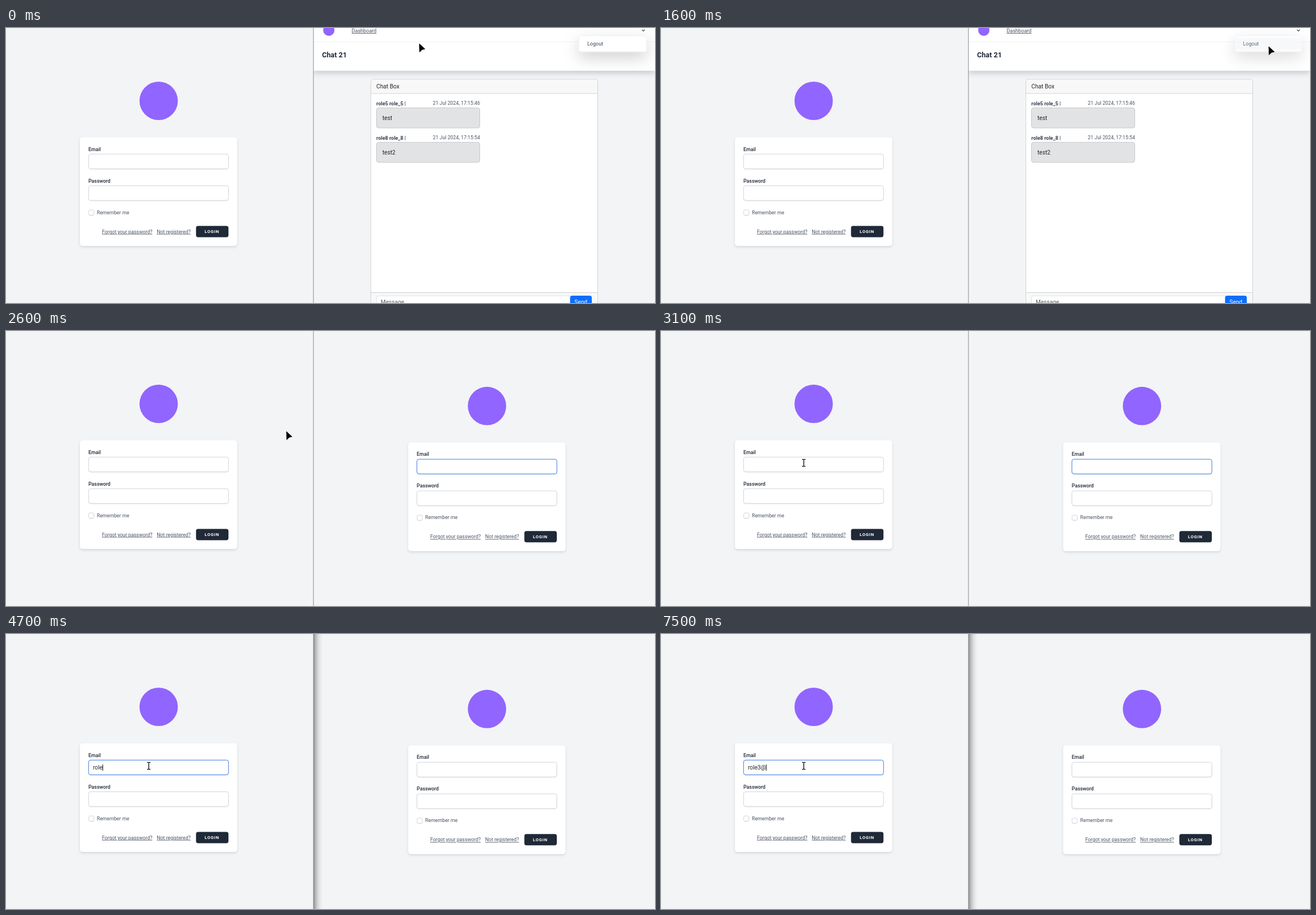
Recreate the animation shown at these times as an HTML page. Size 1150 by 487 pixels, loop 8000 ms.

```html
<!DOCTYPE html>
<html lang="en">
<head>
<meta charset="utf-8">
<title>Login and chat</title>
<style>
  html, body { margin: 0; width: 100%; height: 100%; overflow: hidden; background: #f3f4f6; }
  svg { display: block; width: 100vw; height: 100vh; }
  text { font-family: Roboto, "Noto Sans", sans-serif; font-size: 8.8px; fill: #4b5563; white-space: pre; }
  .label { font-weight: 500; fill: #1f2937; }
  .link { text-decoration: underline; }
  .body { font-size: 10.2px; fill: #212529; }
  .title { font-size: 12.6px; font-weight: 700; fill: #1f2937; }
  .author { font-size: 9px; font-weight: 700; fill: #374151; }
  .button { font-size: 7.7px; font-weight: 700; fill: #fff; letter-spacing: .1em; }
  .field { fill: #fff; stroke: #d1d5db; filter: url(#soft); }
  .field.focus { stroke: #3f7be6; }
  .caret { stroke: #111; stroke-width: 1; }
</style>
</head>
<body>
<svg id="stage" viewBox="0 0 1150 487" preserveAspectRatio="none">
  <defs>
    <filter id="soft" x="-5%" y="-30%" width="110%" height="180%">
      <feDropShadow dx="0" dy=".7" stdDeviation=".7" flood-opacity=".1"/>
    </filter>
    <filter id="raised" x="-10%" y="-10%" width="120%" height="120%">
      <feDropShadow dx="0" dy="2" stdDeviation="2" flood-opacity=".13"/>
    </filter>
    <filter id="band" x="-5%" y="-20%" width="110%" height="160%">
      <feDropShadow dx="0" dy="5" stdDeviation="5" flood-opacity=".16"/>
    </filter>
    <filter id="float" x="-50%" y="-200%" width="200%" height="600%">
      <feDropShadow dx="0" dy="10" stdDeviation="14" flood-opacity=".19"/>
    </filter>
    <linearGradient id="edge">
      <stop offset="0" stop-opacity=".4"/>
      <stop offset=".3" stop-opacity=".2"/>
      <stop offset=".65" stop-opacity=".06"/>
      <stop offset="1" stop-opacity="0"/>
    </linearGradient>
    <clipPath id="pane"><rect x="545" width="605" height="487"/></clipPath>
  </defs>
  <rect width="1150" height="487" fill="#f3f4f6"/>
  <g id="left"></g>
  <g id="right" transform="translate(581.8 3.8)"></g>
  <g id="chat" clip-path="url(#pane)"></g>
  <rect id="windowShadow" x="545" width="16" height="487" fill="url(#edge)"/>
  <path d="M544.8 0V487" stroke="#88898b"/>
  <g id="pointer">
    <path id="arrow" d="M0 0L9.8 9.2L5 10.2L.4 14.6Z" fill="#000" stroke="#000" stroke-width=".8" stroke-linejoin="round"/>
    <path id="hand" d="M0 1q1.3-1.6 2.4 0v4l5 1.2q1.4.5 1.1 2l-.8 5H1.4l-3.8-4.8q.4-1.4 2.4.2Z" fill="#000" stroke="#fff" stroke-width=".6"/>
    <path id="beam" d="M-3-6.2h2L0-5.5l1-.7h2M0-5.5V5.5M-3 6.2h2L0 5.5l1 .7h2" fill="none" stroke="#000" stroke-width="1.3"/>
  </g>
</svg>
<script>
const LOOP = 8000;
const byId = id => document.getElementById(id);

const text = (x, y, value, cls = "", extra = "") =>
  `<text x="${x}" y="${y}" class="${cls}" ${extra}>${value}</text>`;
const rect = (x, y, w, h, r, attrs) =>
  `<rect x="${x}" y="${y}" width="${w}" height="${h}" rx="${r}" ${attrs}/>`;
const badge = (x, y, r) => `<circle cx="${x}" cy="${y}" r="${r}" fill="#9165ff"/>`;

const loginForm = () =>
  badge(270.5, 129, 34) +
  rect(131, 193.5, 278.5, 192.5, 5, 'fill="#fff" filter="url(#raised)"') +
  text(146, 217.5, "Email", "label") +
  rect(146.3, 223.3, 248, 26, 3.7, 'class="field email"') +
  text(154, 240.2, "", "body typed") +
  '<path class="caret"/>' +
  text(146, 273.5, "Password", "label") +
  rect(146.3, 279.3, 248, 26, 3.7, 'class="field"') +
  rect(146.6, 322.2, 9.2, 9.2, 2.5, 'class="field"') +
  text(161, 329.7, "Remember me") +
  text(170, 363.7, "Forgot your password?", "link") +
  text(267.3, 363.7, "Not registered?", "link") +
  rect(336.7, 350.5, 57.5, 20, 3.7, 'fill="#1f2937"') +
  text(352, 363.3, "LOGIN", "button");

const message = (y, author, time, body) =>
  text(656.3, y + 137.3, author + " |", "author") +
  text(840, y + 135.6, time, "", 'text-anchor="end"') +
  rect(656.5, y + 141.4, 183, 35.6, 3.7, 'fill="#e2e3e5" stroke="#c4c8cb"') +
  text(667, y + 163, body, "body");

const chatPage = () =>
  rect(545, 0, 605, 487, 0, 'fill="#f3f4f6"') +
  rect(545, -20, 605, 95.5, 0, 'fill="#fff" filter="url(#band)"') +
  '<path d="M545 24.5H1150" stroke="#f0f1f3"/>' +
  badge(572, 4, 10) +
  text(612.5, 8, "Dashboard", "link", 'style="font-size:9.1px"') +
  '<path d="M1127 3l2.5 2.5L1132 3" fill="none" stroke="#374151" stroke-width="1.1"/>' +
  text(560, 52.3, "Chat 21", "title") +
  '<g id="menu">' +
  rect(1015, 14, 120, 28, 3.7, 'fill="#fff" stroke="#e9eaec" stroke-width=".7" filter="url(#float)"') +
  rect(1015.5, 17.5, 119, 21.5, 0, 'id="hover" fill="#f6f7f8"') +
  text(1030, 31.2, "Logout", "", 'style="fill:#374151;font-size:9px"') +
  "</g>" +
  rect(646.5, 90.9, 402, 420, 3.7, 'fill="#fff" stroke="#d0d2d5"') +
  rect(647, 91.4, 401, 24.5, 3.2, 'fill="#f8f8f8"') +
  '<path d="M647 116H1048M647 468.5H1048" stroke="#d0d2d5"/>' +
  text(656.3, 107, "Chat Box", "body") +
  message(0, "role5 role_5", "21 Jul 2024, 17:15:46", "test") +
  message(61, "role8 role_8", "21 Jul 2024, 17:15:54", "test2") +
  rect(647, 469, 401, 30, 0, 'fill="#f8f8f8"') +
  rect(656.5, 474.3, 346, 24, 3.7, 'fill="#fff" stroke="#dee2e6"') +
  text(664, 489, "Message", "body", 'style="fill:#595f66"') +
  rect(999.5, 474, 38.5, 24, 3.7, 'fill="#0d6efd"') +
  text(1007.3, 489, "Send", "body", 'style="fill:#fff"');

byId("left").innerHTML = loginForm();
byId("right").innerHTML = loginForm();
byId("chat").innerHTML = chatPage();

// Each entry: start time, then the state held until the next entry.
const pointerPath = [
  [0, 732.5, 28], [300, 742, 33], [400, 785, 50], [500, 855, 67], [600, 940, 75],
  [700, 1022, 72], [800, 1078, 60], [900, 1102, 47], [1000, 1090, 37], [1100, 1077, 33],
  [2300, 1030, 48], [2400, 880, 84], [2600, 497, 178], [2700, 424, 197],
  [2800, 360, 212], [2900, 308, 224], [3000, 276, 230], [3100, 253, 233.5]
];
const typing = [[0, ""], [4400, "ro"], [4600, "rol"], [4700, "role"], [5600, "role3"], [6300, "role3@"]];
const leftCaret = [
  [0, false], [3200, true], [3800, false], [4400, true],
  [5300, false], [5600, true], [6200, false], [6300, true], [6900, false], [7500, true]
];

const at = (track, t) => track.findLast(([start]) => start <= t).slice(1);
const show = (node, on) => node.setAttribute("display", on ? "inline" : "none");

function setField(id, focused, value, caretOn) {
  const form = byId(id), typed = form.querySelector(".typed"), caret = form.querySelector(".caret");
  form.querySelector(".email").classList.toggle("focus", focused);
  if (typed.textContent !== value) typed.textContent = value;
  const x = 154.5 + (value ? typed.getComputedTextLength() : 0);
  caret.setAttribute("d", `M${x} 231V242`);
  show(caret, caretOn);
}

function render(t) {
  const [x, y] = at(pointerPath, t);
  const leftActive = t >= 3200;
  const overMenu = t >= 1000 && t < 1600;
  const overField = t >= 2900;

  byId("pointer").setAttribute("transform", `translate(${x} ${y})`);
  show(byId("hand"), overMenu);
  show(byId("beam"), overField);
  show(byId("arrow"), !overMenu && !overField);

  show(byId("chat"), t < 1800);
  show(byId("hover"), t >= 1000);
  const closing = t >= 1600;
  byId("menu").setAttribute("opacity", closing ? .8 : 1);
  byId("menu").setAttribute("transform", closing ? "translate(1135 14) scale(.985) translate(-1135 -14)" : "");

  show(byId("windowShadow"), leftActive);
  setField("left", leftActive, at(typing, t)[0], at(leftCaret, t)[0]);
  setField("right", t >= 1800 && !leftActive, "", t >= 1800 && t < 2400);
}

const begin = performance.now();
function tick() {
  render((performance.now() - begin) % LOOP);
  requestAnimationFrame(tick);
}
tick();
</script>
</body>
</html>
```
